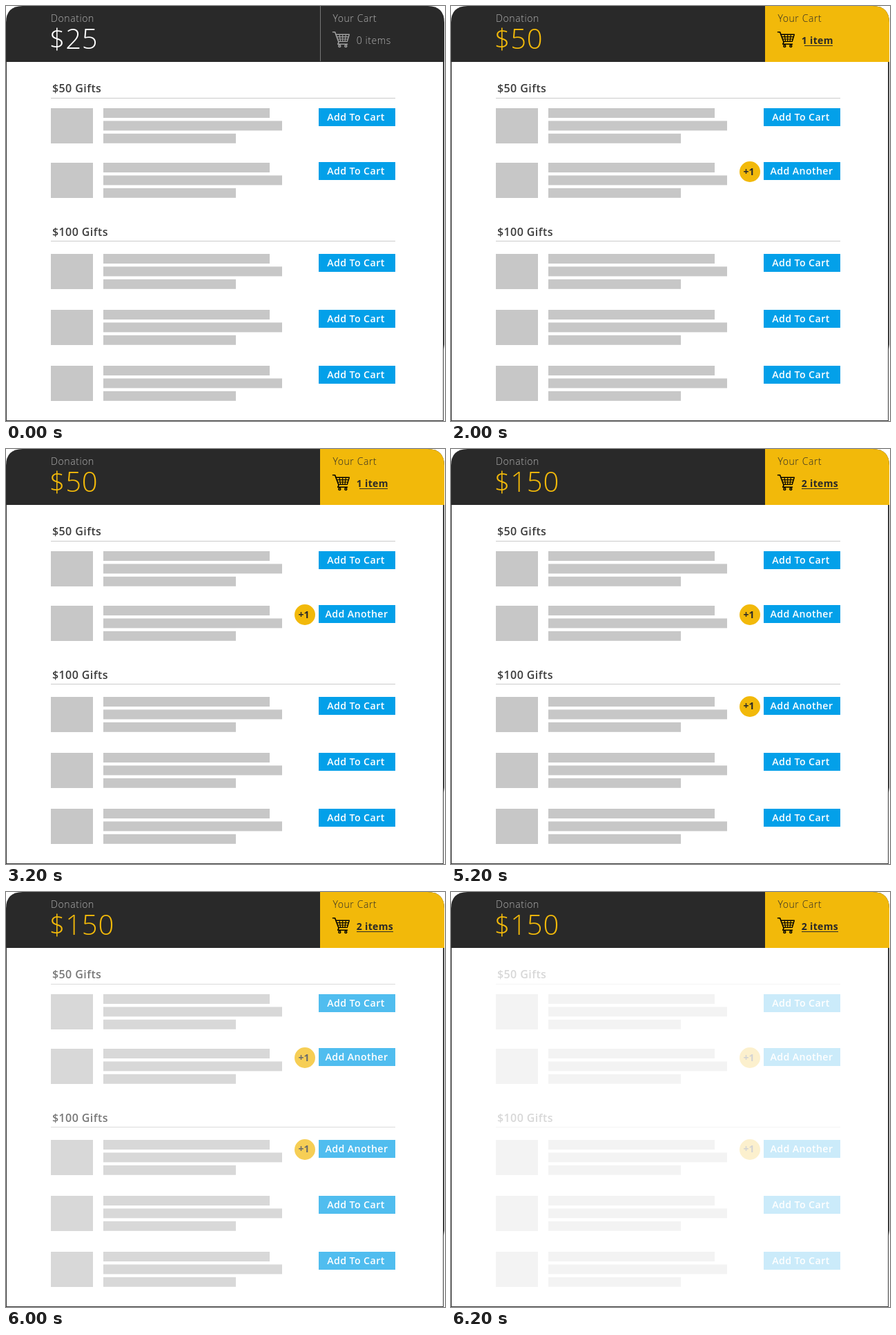
Write an HTML page that moves like this. It is 636 px wide and 601 px high and loops after 6300 ms.

```html
<!DOCTYPE html>
<html lang="en">
<head>
<meta charset="utf-8">
<title>Donation cart</title>
<style>
  html, body { margin: 0; width: 100%; height: 100%; overflow: hidden; background: #fff; }
  svg { display: block; width: 100%; height: 100%; }
  text { font-family: "Open Sans", "Noto Sans", sans-serif; white-space: pre; }
  .label { font-size: 14px; font-weight: 300; letter-spacing: .6px; }
  .total { font-size: 40px; font-weight: 300; letter-spacing: .8px; }
  .head { font-size: 16px; font-weight: 600; letter-spacing: .42px; fill: #3c3c3c; }
  .btn { font-size: 14.2px; font-weight: 600; letter-spacing: .4px; fill: #fff; }
  .badge { font-size: 14px; font-weight: 700; fill: #292929; }
  .count { font-size: 14px; font-weight: 700; letter-spacing: .35px; }
</style>
</head>
<body>
<svg viewBox="0 0 636 601" xmlns="http://www.w3.org/2000/svg">
  <path d="M0 81V24Q0 0 24 0H611Q635 0 635 24V81Z" fill="#292929"/>
  <path id="panel" d="M455 81V0H611Q635 0 635 24V81Z" fill="#f2b90a"/>
  <rect id="divider" x="455" width="1" height="80" fill="#777"/>

  <g fill="#3a3a3a">
    <rect y="81" width="1" height="520"/>
    <rect y="600" width="634" height="1"/>
    <rect x="633" y="81" width="1" height="520"/>
    <path d="M634 81H635V490L634 498Z"/>
  </g>

  <text class="label" x="65" y="23" fill="#b4b4b4">Donation</text>
  <text class="total" id="total" x="62.6" y="62.4"></text>

  <g id="cart">
    <text class="label" x="473.4" y="23" fill="currentColor">Your Cart</text>
    <text id="count" x="507.7" y="55" fill="currentColor"></text>
    <rect id="rule" y="57" height="1" fill="currentColor"/>
    <g id="icon" fill="none" stroke-linecap="round" stroke-linejoin="round">
      <path d="M473.5 37.8H476.6L482 52.3L480.8 55.2H494.5" stroke-width="1.6"/>
      <path d="M478 41.2H497.3L494.3 51.4H481.7" stroke-width="1.4"/>
      <path d="M479.3 44.6H496.2M480.5 48H495.2M483 41.2L484.6 51.4M487.7 41.2V51.4M492.4 41.2L491 51.4" stroke-width="1.1"/>
      <circle cx="483.3" cy="58" r="1.5" stroke-width="1.4"/>
      <circle cx="492.3" cy="58" r="1.5" stroke-width="1.4"/>
    </g>
  </g>

  <g id="list"></g>
</svg>
<script>
const $ = id => document.getElementById(id);

function add(parent, tag, attrs, text = "") {
  const el = document.createElementNS("http://www.w3.org/2000/svg", tag);
  for (const key in attrs) el.setAttribute(key, attrs[key]);
  el.textContent = text;
  parent.append(el);
  return el;
}

const list = $("list");
const rect = (x, y, width, height, fill) => add(list, "rect", { x, y, width, height, fill });

function heading(text, y, ruleY) {
  add(list, "text", { class: "head", x: 67, y }, text);
  rect(65, ruleY, 499, 1, "#cbcbcb");
}

// y: top of the thumbnail, btnY: top of the button
function giftRow(y, btnY) {
  const grey = "#c7c7c7";
  rect(65, y, 61, 51, grey);
  [241, 259, 192].forEach((w, i) => rect(141, y + i * 18.4, w, 14, grey));
  rect(453, btnY, 111, 26, "#03a0e9");
  const label = add(list, "text", { class: "btn", y: btnY + 18 });
  const badge = add(list, "g", {});
  add(badge, "circle", { cx: 433, cy: btnY + 14, r: 15, fill: "#f2b90a" });
  add(badge, "text", { class: "badge", x: 423.4, y: btnY + (btnY < 300 ? 19 : 18) }, "+1");
  return added => {
    label.textContent = added ? "Add Another" : "Add To Cart";
    label.setAttribute("x", added ? 462.4 : 465.2);
    badge.style.display = added ? "" : "none";
  };
}

heading("$50 Gifts", 125, 133);
heading("$100 Gifts", 333, 340);
const rows = [[148, 148], [227, 226], [359, 359], [440, 440], [521, 521]]
  .map(([y, btnY]) => giftRow(y, btnY));

const carts = [
  { total: "$25", count: "0 items", added: [], rule: [508, 0] },
  { total: "$50", count: "1 item", added: [1], rule: [512, 41] },
  { total: "$150", count: "2 items", added: [1, 2], rule: [508, 53] }
];

const steps = [
  { at: 0, cart: 0, opacity: 1 },
  { at: 2000, cart: 1, opacity: 1 },
  { at: 4000, cart: 2, opacity: 1 },
  { at: 6000, cart: 2, opacity: .69 },
  { at: 6100, cart: 2, opacity: .48 },
  { at: 6200, cart: 2, opacity: .2 }
];
const LOOP = 6300;

function show({ cart, opacity }) {
  const c = carts[cart], filled = cart > 0;
  $("panel").style.display = filled ? "" : "none";
  $("divider").style.display = filled ? "none" : "";
  $("total").textContent = c.total;
  $("total").setAttribute("fill", filled ? "#f2b90a" : "#fff");
  $("cart").style.color = filled ? "#292929" : "#b4b4b4";
  $("icon").setAttribute("stroke", filled ? "#000" : "#a0a0a0");
  $("count").textContent = c.count;
  $("count").setAttribute("class", filled ? "count" : "label");
  $("rule").setAttribute("x", c.rule[0]);
  $("rule").setAttribute("width", c.rule[1]);
  rows.forEach((set, i) => set(c.added.includes(i)));
  list.style.opacity = opacity;
}

let current = steps[0];
show(current);
const start = performance.now();

function tick() {
  const t = (performance.now() - start) % LOOP;
  const step = steps.findLast(s => s.at <= t);
  if (step !== current) show(current = step);
  requestAnimationFrame(tick);
}
requestAnimationFrame(tick);
</script>
</body>
</html>
```
